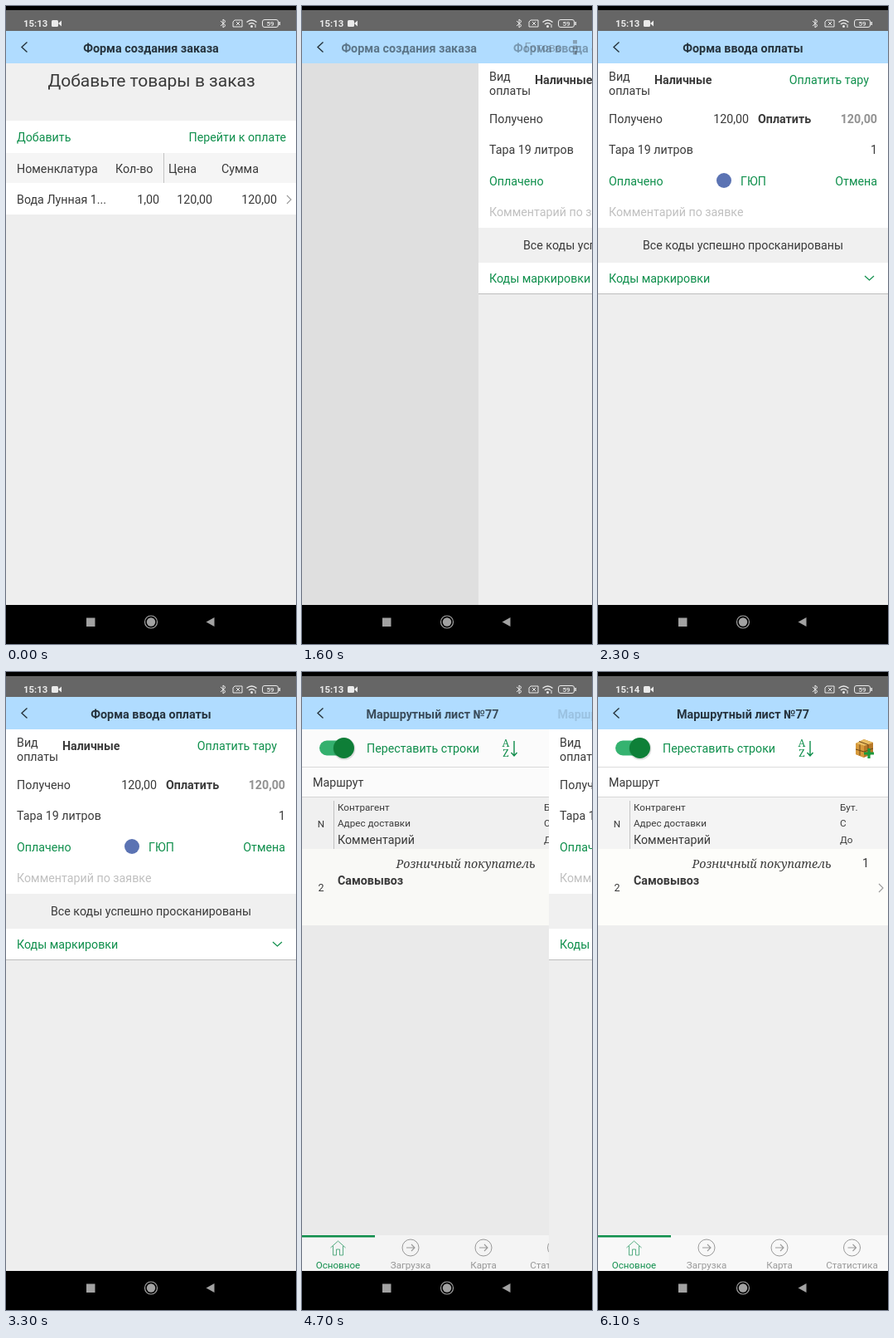
These frames come from a looping animation (350 by 768 pixels, 6400 ms). An HTML page:

```html
<!DOCTYPE html>
<html lang="ru">
<head>
<meta charset="utf-8">
<title>Оформление заказа</title>
<style>
  html, body { margin: 0; width: 100%; height: 100%; overflow: hidden; background: #000; }
  svg { display: block; font-family: Roboto, sans-serif; }
</style>
</head>
<body>
<svg id="stage" width="350" height="768" viewBox="0 0 350 768"></svg>
<script>
const LOOP = 6400, STEP = 100, WIDTH = 350;
const INK = '#3a3a3a', GREEN = '#0f8f4c', PALE = '#8ac9a8', GREY = '#9a9a9a';
const TITLES = { order: 'Форма создания заказа', pay: 'Форма ввода оплаты', route: 'Маршрутный лист №77' };

// cy is the middle of the capital letters
const text = (x, cy, string, { size = 14.26, fill = INK, weight = 400, anchor = 'start', extra = '' } = {}) =>
  `<text x="${x}" y="${Math.round(cy + size * 0.355)}" font-size="${size}" fill="${fill}" font-weight="${weight}" text-anchor="${anchor}" ${extra}>${string}</text>`;
const rect = (x, y, w, h, fill, extra = '') =>
  `<rect x="${x}" y="${y}" width="${w}" height="${h}" fill="${fill}" ${extra}/>`;
const line = (d, stroke, width = 1, extra = '') =>
  `<path d="${d}" fill="none" stroke="${stroke}" stroke-width="${width}" ${extra}/>`;
const shape = (d, fill) => `<path d="${d}" fill="${fill}"/>`;
const circle = (x, y, r, fill, extra = '') => `<circle cx="${x}" cy="${y}" r="${r}" fill="${fill}" ${extra}/>`;
const group = (id, ...parts) => `<g id="${id}">${parts.join('')}</g>`;

const end = { anchor: 'end' }, middle = { anchor: 'middle' }, green = { fill: GREEN }, bold = { weight: 700 };
const rowArrow = y => line(`M339 ${y - 5}l5 5-5 5`, '#999', 1.1);

const order = group('order',
  rect(0, 69, 350, 69, '#f0f0f0'),
  rect(0, 138, 350, 39, '#fff'),
  rect(0, 177, 350, 36, '#f5f5f5'),
  rect(0, 213, 350, 38, '#fff'),
  rect(190, 177, 1, 36, '#c4c4c4'),
  text(175.5, 90, 'Добавьте товары в заказ', { size: 21, ...middle }),
  text(13, 158, 'Добавить', green),
  text(338, 158, 'Перейти к оплате', { ...green, ...end, extra: 'id="checkout"' }),
  text(13, 196, 'Номенклатура'), text(132, 196, 'Кол-во'), text(196, 196, 'Цена'), text(260, 196, 'Сумма'),
  text(13, 233, 'Вода Лунная 1...'), text(185, 233, '1,00', end),
  text(249, 233, '120,00', end), text(327, 233, '120,00', end),
  rowArrow(233));

const pay = group('pay',
  rect(0, 69, 350, 652, '#eee'),
  rect(0, 69, 350, 277, '#fff'),
  rect(0, 267, 350, 42, '#f0f0f0'),
  rect(0, 346, 350, 1, '#bdbdbd'),
  text(13, 85, 'Вид'), text(13, 102, 'оплаты'),
  text(68, 89, 'Наличные', bold), text(327, 89, 'Оплатить тару', { ...green, ...end }),
  text(13, 136, 'Получено'), text(182, 136, '120,00', end),
  text(193, 136, 'Оплатить', bold), text(337, 136, '120,00', { ...end, ...bold, fill: '#929292' }),
  text(13, 173, 'Тара 19 литров'), text(337, 173, '1', end),
  text(13, 211, 'Оплачено', { ...green, extra: 'id="paid"' }),
  circle(152, 210, 9, '#5b73b3'),
  text(172, 211, 'ГЮП', green), text(337, 211, 'Отмена', { ...green, ...end }),
  text(13, 248, 'Комментарий по заявке', { fill: '#c0c0c0' }),
  text(175, 288, 'Все коды успешно просканированы', middle),
  text(13, 328, 'Коды маркировки', green),
  line('M322 325l5.5 5 5.5-5', GREEN, 1.2));

const tab = (x, label, active) =>
  text(x, 713.5, label, { size: 11.6, anchor: 'middle', fill: active ? GREEN : GREY }) +
  (active
    ? line(`M${x - 9} 693l9-8 9 8M${x - 6} 691v11h4v-7h4v7h4v-11`, '#45a576', 0.9)
    : circle(x, 693, 10, 'none', `stroke="${GREY}"`) + line(`M${x - 5} 693h10m-4-4l4 4-4 4`, GREY, 1.1));

const small = { size: 11.7 };
const letter = { size: 12.5, fill: GREEN, anchor: 'middle', extra: 'font-family="Noto Serif, serif"' };
const route = group('route',
  rect(0, 69, 350, 81, '#fff'),
  rect(0, 114, 350, 1, '#dcdcdc'),
  rect(0, 150, 350, 63, '#f4f4f4'),
  rect(0, 150, 350, 1, '#d8d8d8'),
  rect(38, 155, 1, 58, '#c4c4c4'),
  rect(0, 213, 350, 92, '#fdfdfa'),
  rect(21, 82.5, 40, 18, '#35b370', 'rx="9"'),
  circle(51, 92.5, 13.5, '#000', 'opacity="0.12"'),
  circle(50.5, 91.5, 12.5, '#0e8038'),
  text(78, 92, 'Переставить строки', green),
  text(246, 86, 'A', letter), text(246, 97.5, 'Z', letter),
  line('M256 83v18m-3.5-4l3.5 4 3.5-4', GREEN, 1.4),
  shape('M311 86l10-5 11 4v13l-11 5-10-4z', '#b87928'),
  shape('M311 86l10-5 11 4-11 4z', '#e9bd62'),
  shape('M311 86l10 3v14l-10-4z', '#d79a3c'),
  line('M315 83.5l11 4v6M316 87.5v13M311 93l10 3 11-4', '#6d4617', 1),
  line('M327 92v12M321 98h12', '#1c9b3c', 3.2),
  text(13, 132.5, 'Маршрут'),
  text(23, 182.5, 'N', { ...small, ...middle }),
  text(43, 163, 'Контрагент', small), text(43, 182, 'Адрес доставки', small), text(43, 201.5, 'Комментарий'),
  text(292, 163, 'Бут.', small), text(292, 182, 'С', small), text(292, 201.5, 'До', small),
  text(197.5, 231, 'Розничный покупатель', { ...middle, extra: 'font-family="Noto Serif, serif" font-style="italic"' }),
  text(43, 251, 'Самовывоз', bold),
  text(327, 230, '1', end), text(23, 260, '2', { size: 12.5, ...middle }),
  rowArrow(260),
  rect(0, 678, 350, 43, '#f8f8f8'),
  rect(0, 678, 88, 2.5, GREEN),
  tab(43.5, 'Основное', true), tab(131, 'Загрузка'), tab(219, 'Карта'), tab(306.5, 'Статистика'));

const title = id => text(175, 50.5, '', { ...middle, size: 14.35, weight: 700, fill: '#26333d', extra: `id="${id}"` });
const header = group('header',
  rect(0, 30, 350, 39, '#b0dcff'),
  title('backTitle'), title('frontTitle'),
  group('ghost', text(314, 50, 'Готово', end), ...[41, 47.5, 54].map(y => rect(327, y, 5, 4.5, INK))),
  line('M25.5 43.5l-6.5 6 6.5 6', '#26333d', 1.4));

const LIGHT = '#eaeaea', KEY = '#a2a2a2';
const bars = group('bars',
  rect(0, 0, 350, 5, '#000'),
  rect(0, 5, 350, 25, '#666'),
  text(21, 21, '15:13', { size: 11.4, weight: 700, fill: LIGHT, extra: 'id="clock"' }),
  rect(55, 17, 8, 8, LIGHT, 'rx="1.5"'), shape('M63 21l4-3.5v7z', LIGHT),
  line('M259 18l6 5.5-3 2.5v-10l3 2.5-6 5.5', LIGHT, 1),
  line('M276 17h9v8h-11v-6zM278 19l4 4m0-4l-4 4', LIGHT, 1),
  line('M290.5 19.5q6-5 12 0M293 22q3.5-3 7 0', LIGHT, 1.5), circle(296.5, 24.5, 1.5, LIGHT),
  line('M301 22v4', LIGHT, 1),
  rect(309.5, 16.5, 19, 9, 'none', `rx="2.5" stroke="${LIGHT}"`), rect(329.5, 19, 1.5, 4, LIGHT),
  text(319, 21, '59', { size: 8, weight: 500, fill: LIGHT, ...middle }),
  rect(0, 721, 350, 47, '#000'),
  rect(97, 736.5, 10.5, 10.5, KEY),
  circle(175, 741.5, 7.5, 'none', `stroke="${KEY}" stroke-width="1.2"`), circle(175, 741.5, 5.2, KEY),
  shape('M241.5 741.5l10-5.5v11z', KEY));

document.getElementById('stage').innerHTML =
  rect(0, 69, 350, 652, '#eee') + order + route +
  rect(0, 69, 350, 652, '#000', 'id="shade"') + pay + header + bars;

const $ = id => document.getElementById(id);
const show = (id, on) => $(id).setAttribute('display', on ? 'inline' : 'none');
const fade = (id, opacity) => $(id).setAttribute('opacity', opacity);

function slide(t, start) {
  const k = Math.min(1, Math.max(0, (t - start) / 300));
  return 1 - (1 - k) ** 2;
}

function setTitle(id, name, x, opacity) {
  $(id).textContent = TITLES[name];
  $(id).setAttribute('x', x);
  fade(id, opacity);
}

function draw(t) {
  const push = slide(t, 1534), pop = slide(t, 4516);
  const cover = push - pop;
  show('order', push === 0);
  show('route', pop > 0);
  show('pay', cover > 0);
  $('pay').setAttribute('transform', `translate(${Math.round(WIDTH * (1 - cover))} 0)`);
  fade('shade', 0.25 * cover ** 1.5);
  setTitle('backTitle', pop ? 'route' : 'order', 175 - 117 * cover, 1 - cover);
  setTitle('frontTitle', pop ? 'route' : 'pay', 175 + 251 * (1 - cover), cover);
  fade('ghost', pop ? 0 : 1.5 * cover * (1 - cover));
  $('checkout').setAttribute('fill', t >= 300 ? PALE : GREEN);
  $('paid').setAttribute('fill', t >= 4500 && !pop ? PALE : GREEN);
  $('clock').textContent = t >= 5200 ? '15:14' : '15:13';
}

const begin = performance.now();
function tick() {
  const t = (performance.now() - begin) % LOOP;
  draw(Math.floor(t / STEP) * STEP);
  requestAnimationFrame(tick);
}
tick();
</script>
</body>
</html>
```
